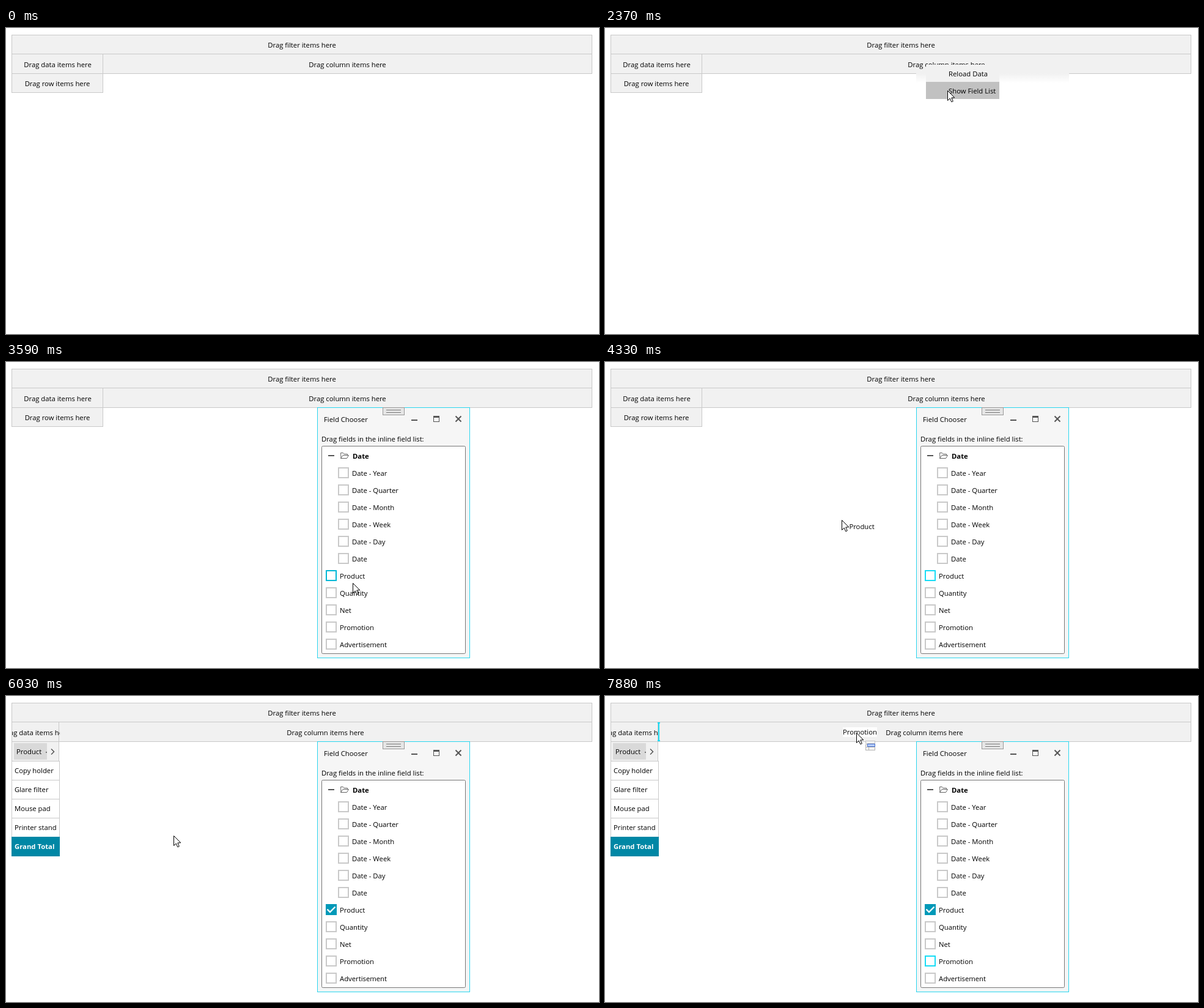
Write an HTML page with a canvas that moves like this. It is 970 px wide and 500 px high and loops after 8 s.

```html
<!DOCTYPE html>
<html>
<head>
<meta charset="utf-8">
<style>
html, body { margin: 0; width: 100%; height: 100%; overflow: hidden; background: #fff; }
canvas { display: block; }
</style>
</head>
<body>
<canvas id="stage" width="970" height="500"></canvas>
<script>
const ctx = document.getElementById('stage').getContext('2d');
const LOOP = 8000;
const PANEL = '#f1f1f1', LINE = '#c9c9c9', GLYPH = '#555', CYAN = '#18dcf5';
const FIELDS = ['Date - Year', 'Date - Quarter', 'Date - Month', 'Date - Week', 'Date - Day', 'Date',
  'Product', 'Quantity', 'Net', 'Promotion', 'Advertisement'];
const PRODUCT = 6, PROMOTION = 9;

const TIME = { enter: 190, menu: 1260, chooser: 2370, unroll: 2440,
  dragProduct: 4030, release: 5280, dropped: 5420, dragPromotion: 6840 };

// Eased pointer moves, with rests between them
const START = { x: 700, y: 413 };
const MOVES = [
  { from: TIME.enter, to: 870, x: 526, y: 62 },
  { from: 950, to: 1030, x: 524, y: 59 },
  { from: 1640, to: 2140, x: 560, y: 102 },
  { from: 2560, to: 3580, x: 567, y: 361 },
  { from: 3640, to: 3800, x: 573, y: 355 },
  { from: 3950, to: 4870, x: 73, y: 94 },
  { from: 5656, to: 6470, x: 528, y: 397 },
  { from: 6500, to: 6770, x: 577, y: 439 },
  { from: TIME.dragPromotion, to: 7360, x: 427, y: 83 },
  { from: 7430, to: 7960, x: 410, y: 59 },
];

const progress = (t, from, to) => Math.min(1, Math.max(0, (t - from) / (to - from)));

function pointerAt(t) {
  return MOVES.reduce((at, move) => {
    const p = progress(t, move.from, move.to), k = p * p * (3 - 2 * p);
    return { x: at.x + (move.x - at.x) * k, y: at.y + (move.y - at.y) * k };
  }, START);
}

function text(str, x, baseline, { align = 'left', color = '#000', bold = false } = {}) {
  ctx.font = `${bold ? 'bold ' : ''}11.3px "Open Sans", "Noto Sans", sans-serif`;
  ctx.textAlign = align;
  ctx.fillStyle = color;
  ctx.fillText(str, x, baseline);
}

function fill(x, y, w, h, color) {
  ctx.fillStyle = color;
  ctx.fillRect(x, y, w, h);
}

// Bordered box given by its outer pixel edges
function box(x, y, w, h, bg, border, width = 1) {
  fill(x, y, w, h, border);
  fill(x + width, y + width, w - 2 * width, h - 2 * width, bg);
}

function stroke(points, color, width = 1) {
  ctx.strokeStyle = color;
  ctx.lineWidth = width;
  ctx.beginPath();
  points.forEach(([x, y]) => ctx.lineTo(x, y));
  ctx.stroke();
}

function clipped(x, y, w, h, draw) {
  ctx.save();
  ctx.beginPath();
  ctx.rect(x, y, w, h);
  ctx.clip();
  draw();
  ctx.restore();
}

function drawGrid(dropped) {
  const split = dropped ? 86 : 158;
  box(9, 11, 950, 32, PANEL, LINE);
  box(9, 42, 950, 33, PANEL, LINE);
  fill(split, 42, 1, 33, LINE);
  text('Drag filter items here', 484, 32, { align: 'center' });
  text('Drag column items here', (split + 959) / 2, 64, { align: 'center' });
  clipped(10, 43, split - 8, 31, () =>
    text('Drag data items here', (9 + split) / 2 + 1, 64, { align: 'center' }));
  box(9, 74, split - 8, dropped ? 33 : 32, PANEL, LINE);
  if (!dropped) {
    text('Drag row items here', 84, 95, { align: 'center' });
    return;
  }
  fill(13, 77, 54, 27, '#d9d9d9');
  text('Product', 17, 95);
  fill(65, 91, 2, 2, '#777');
  stroke([[74, 86.5], [78.5, 91], [74, 95.5]], GLYPH, 1.5);
  ['Copy holder', 'Glare filter', 'Mouse pad', 'Printer stand'].forEach((name, i) => {
    box(9, 106 + 31 * i, 79, 32, '#fff', LINE);
    text(name, 14, 126 + 31 * i);
  });
  fill(9, 230, 79, 32, '#0087a5');
  text('Grand Total', 14, 250, { color: '#fff', bold: true });
}

function drawMenu(t, pointer) {
  ctx.globalAlpha = 0.5 + 0.5 * progress(t, TIME.menu, TIME.menu + 60);
  ['Reload Data', 'Show Field List'].forEach((label, i) => {
    const y = 60 + 28 * i;
    const hover = pointer.x >= 525 && pointer.y >= y && pointer.y < y + 28;
    fill(525, y, 120, 28, hover ? '#c1c1c1' : PANEL);
    text(label, 562, y + 19);
  });
  ctx.globalAlpha = 1;
}

function fieldColor(i, t, pointer, drag) {
  if (drag) {
    if (drag.field !== i) return LINE;
    return t - drag.start < 220 ? '#008799' : CYAN;
  }
  const row = Math.floor((pointer.y - 167) / 28);
  return row === i && pointer.x > 517 && pointer.x < 751 ? '#00b8d6' : LINE;
}

function drawChooser(t, pointer, drag) {
  box(509, 74, 250, 410, '#f6f6f6', '#29d5ee');
  box(616, 74, 36, 13, '#e6e6e6', '#999');
  fill(622, 78, 24, 1, '#777');
  fill(622, 82, 24, 1, '#777');
  text('Field Chooser', 520, 98);
  fill(663, 94, 10, 2, GLYPH);
  box(699, 88, 10, 10, '#f6f6f6', GLYPH);
  fill(699, 88, 10, 3, GLYPH);
  stroke([[735.5, 88.5], [744.5, 97.5]], GLYPH, 2);
  stroke([[744.5, 88.5], [735.5, 97.5]], GLYPH, 2);
  text('Drag fields in the inline field list:', 516, 130);

  ctx.beginPath();
  ctx.roundRect(516.5, 137.5, 235, 339, 2);
  ctx.fillStyle = '#fff';
  ctx.fill();
  ctx.strokeStyle = '#777';
  ctx.lineWidth = 1;
  ctx.stroke();
  fill(527, 152, 10, 2, GLYPH);
  stroke([[548, 157.5], [547.5, 148.5], [551.5, 148.5], [553, 150.5], [558.5, 150.5], [558.5, 152]], '#666');
  stroke([[547.5, 157.5], [551, 152.5], [560.5, 152.5], [557.5, 157.5], [547.5, 157.5]], '#666');
  text('Date', 567, 158, { bold: true });

  FIELDS.forEach((name, i) => {
    const x = i < PRODUCT ? 543 : 523, y = 172 + 28 * i;
    if (i === PRODUCT && t >= TIME.dropped) {
      fill(x, y, 18, 18, '#0099b8');
      stroke([[x + 2.5, y + 8.5], [x + 7, y + 13], [x + 15.5, y + 4.5]], '#fff', 2.4);
    } else {
      box(x, y, 18, 18, '#fff', fieldColor(i, t, pointer, drag), 2);
    }
    text(name, x + 23, y + 14);
  });
}

// A soft strip first, from which the chooser unrolls downwards
function openChooser(t, pointer, drag) {
  if (t < TIME.unroll) {
    const fade = ctx.createLinearGradient(0, 74, 0, 90);
    fade.addColorStop(0, PANEL);
    fade.addColorStop(1, '#fff');
    fill(509, 74, 250, 16, fade);
    return;
  }
  const k = progress(t, TIME.unroll, TIME.unroll + 230);
  ctx.globalAlpha = k;
  clipped(509, 74, 250, 16 + 394 * k, () => drawChooser(t, pointer, drag));
  ctx.globalAlpha = 1;
}

function drawIndicator(x, top, bottom) {
  fill(x + 1, top, 2, bottom - top, CYAN);
  fill(x, top, 4, 2, CYAN);
  fill(x, bottom - 2, 4, 2, CYAN);
}

function drawDropIcon(x, y, field) {
  box(x, y, 16, 5, '#f4f4f4', '#c4c4c4');
  box(x, y + 6, 16, 10, '#f4f4f4', '#b5b5b5');
  fill(x + 5, y + 6, 1, 10, '#b5b5b5');
  fill(x, y + 10, 16, 1, '#b5b5b5');
  if (field === PRODUCT) box(x, y + 7, 5, 9, '#b9d0ff', '#4a72cf');
  else box(x + 3, y + 5, 13, 5, '#b9d0ff', '#4a72cf');
}

// The label trails slightly behind the pointer
function drawDragged({ field }, t, pointer) {
  const inRows = field === PRODUCT && pointer.x < 159 && pointer.y < 106;
  const inColumns = field === PROMOTION && pointer.y < 74;
  if (inRows) drawIndicator(9, 76, 105);
  if (inColumns) drawIndicator(86, 43, 74);
  if (field === PRODUCT && t >= TIME.release) return;

  const at = pointerAt(t - 36);
  const x = Math.round(at.x + 5), y = Math.round(at.y - 3);
  const width = field === PRODUCT ? 42 : 56;
  fill(x - width / 2, y - 8, width, 16, 'rgba(255,255,255,.9)');
  text(FIELDS[field], x, y + 4, { align: 'center' });
  if (inRows || inColumns) drawDropIcon(Math.round(pointer.x) + 15, Math.round(pointer.y) + 13, field);
}

function drawPointer({ x, y }) {
  ctx.save();
  ctx.translate(Math.round(x) + .5, Math.round(y) + .5);
  ctx.beginPath();
  [[0, 0], [0, 16], [3.7, 12.5], [6.3, 18.3], [8.8, 17.2], [6.3, 11.5], [11.3, 11.3]]
    .forEach(([px, py]) => ctx.lineTo(px, py));
  ctx.closePath();
  ctx.fillStyle = '#fff';
  ctx.fill();
  ctx.strokeStyle = '#000';
  ctx.lineWidth = 1;
  ctx.stroke();
  ctx.restore();
}

function dragAt(t) {
  if (t >= TIME.dragPromotion) return { field: PROMOTION, start: TIME.dragPromotion };
  if (t >= TIME.dragProduct && t < TIME.dropped) return { field: PRODUCT, start: TIME.dragProduct };
  return null;
}

function draw(t) {
  const pointer = pointerAt(t), drag = dragAt(t);
  fill(0, 0, 970, 500, '#fff');
  drawGrid(t >= TIME.dropped);
  if (t >= TIME.chooser) openChooser(t, pointer, drag);
  if (t >= TIME.menu && t < TIME.unroll) drawMenu(t, pointer);
  if (drag) drawDragged(drag, t, pointer);
  if (t >= TIME.enter) drawPointer(pointer);
}

function frame() {
  draw(performance.now() % LOOP);
  requestAnimationFrame(frame);
}
frame();
</script>
</body>
</html>
```
